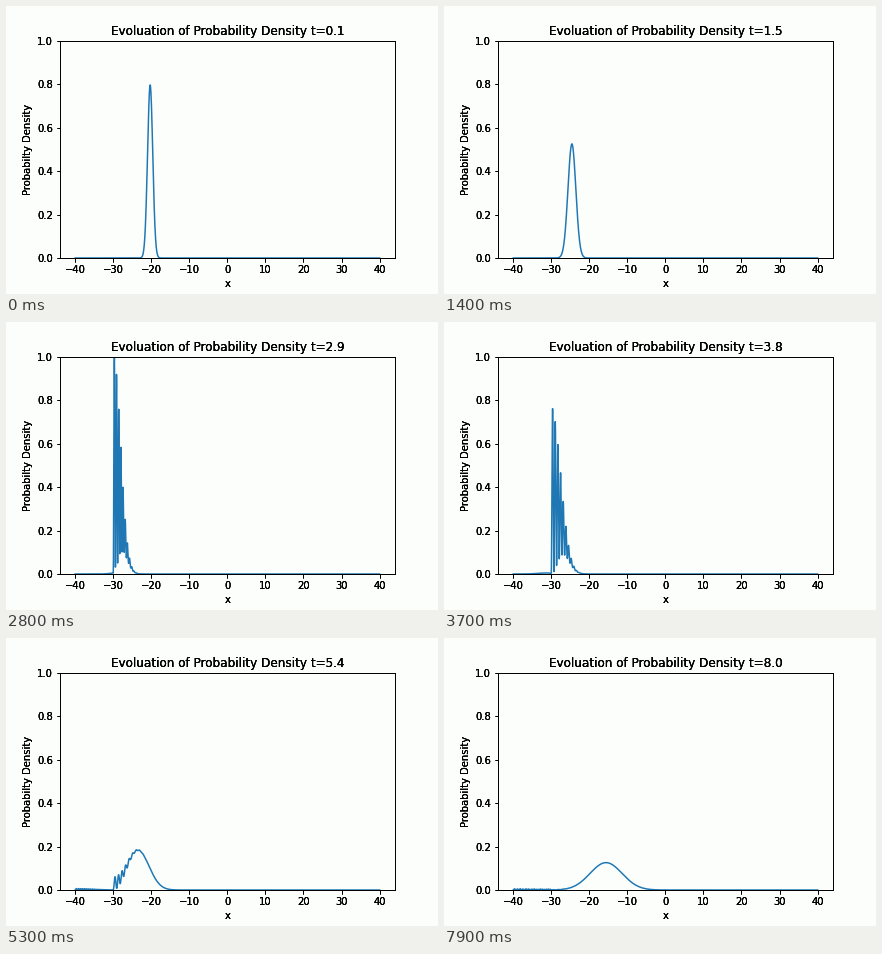
These frames come from a looping animation (432x288 px, 8 s). A matplotlib script:

```python
import numpy as np
import matplotlib.pyplot as plt
from matplotlib.animation import FuncAnimation

W, H, DPI = 432, 288, 72
FRAMES, INTERVAL = 80, 100
PAPER = "#fcfefc"

# Gaussian packet sent left from START, thin barrier and outer wall
START, BARRIER, WALL = -20, -30, -40
SIGMA, SPREAD, SPEED, K = 0.68, 1.31, 3.05, 5.0
REFLECT, LEAK = 0.988, 0.135

x = np.linspace(-40, 40, 1601)
z = START - x                 # distance travelled from the start
GAP, FAR = START - BARRIER, START - WALL


def packet(d, t):
    q = 1 + 1j * t / SPREAD
    envelope = np.exp(-(d - SPEED * t) ** 2 / (4 * SIGMA ** 2 * q))
    return (2 / np.pi) ** 0.25 / np.sqrt(q) * envelope * np.exp(1j * K * d)


def density(t):
    front = packet(z, t) - REFLECT * packet(2 * GAP - z, t)
    lap = 2 * (FAR - GAP)
    behind = sum(packet(z + n * lap, t) - packet(2 * FAR - z + n * lap, t)
                 for n in range(2))
    return np.abs(np.where(z < GAP, front, LEAK * behind)) ** 2


plt.rcParams["font.family"] = "DejaVu Sans"
fig = plt.figure(figsize=(W / DPI, H / DPI), dpi=DPI, facecolor=PAPER)


def make_axes(label):
    ax = fig.add_axes([0.125, 0.125, 0.775, 0.755], label=label)
    ax.set_xlim(-44, 44)
    ax.set_ylim(0, 1)
    ax.set_xticks(range(-40, 41, 10))
    ax.set_xlabel("x")
    ax.set_ylabel("Probabilty Density")
    ax.patch.set_visible(False)
    return ax


# Stacked copies give the heavy, hard-edged lettering
layers = [make_axes(f"layer{i}") for i in range(3)]
line, = layers[0].plot(x, density(0.1), color="#1f77b4", lw=1.5)
titles = [ax.set_title("") for ax in layers]


def update(i):
    t = (i + 1) / 10
    line.set_ydata(density(t))
    for title in titles:
        title.set_text(f"Evoluation of Probability Density t={t:.1f}")
    return [line, *titles]


anim = FuncAnimation(fig, update, frames=FRAMES, interval=INTERVAL,
                     repeat=True, repeat_delay=0, blit=False)
plt.show()
```
